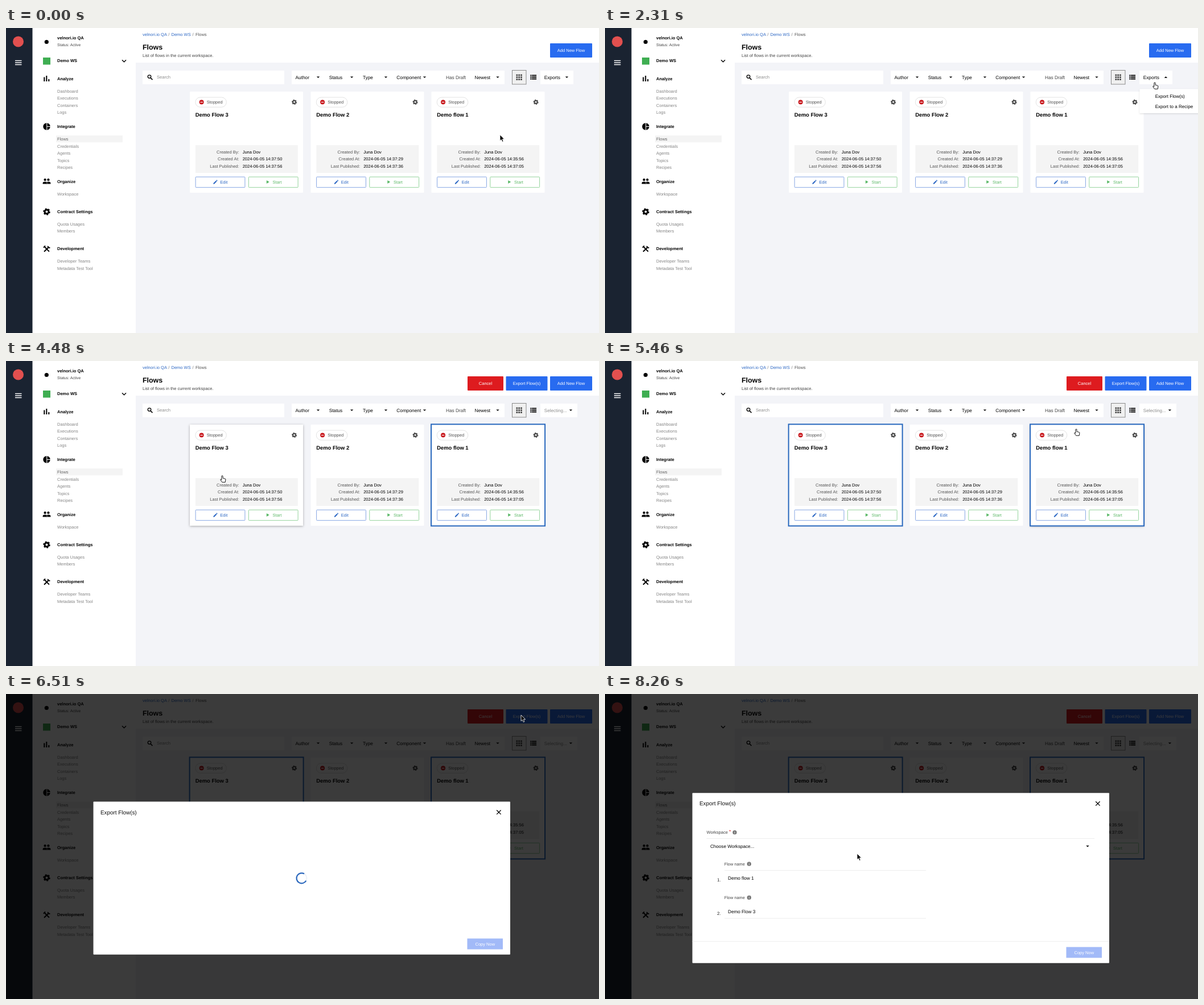
Recreate the animation shown at these times as an HTML page. Size 1042 by 537 pixels, loop 8.75 s.

```html
<!DOCTYPE html>
<html lang="en">
<head>
<meta charset="utf-8">
<title>Export flows</title>
<style>
  html, body { margin: 0; width: 100%; height: 100%; overflow: hidden; background: #fff; }
  svg { display: block; width: 100%; height: 100%; }
  text {
    font-family: "Liberation Sans", Arial, sans-serif;
    text-rendering: geometricPrecision;
    white-space: pre;
  }
</style>
</head>
<body>
<svg id="stage" viewBox="0 0 1042 537" xmlns="http://www.w3.org/2000/svg"></svg>
<script>
const LOOP = 8750, STEP = 70;
const ORG = 'velnori.io QA', USER = 'Juna Dov';
const BLUE = '#286bf0', PALE = '#a2baf8', LINK = '#2d68c4', GREY = '#858585';
const CARD_X = [323, 535.5, 747.5], CARD_Y = 112, CARD_W = 199, CARD_H = 178;

// y is the vertical middle of the line
const text = (x, y, s, size = 7.5, fill = '#000', extra = '') =>
  `<text x="${x}" y="${(y + size * 0.35).toFixed(2)}" font-size="${size}" fill="${fill}" ${extra}>${s}</text>`;
const bold = (x, y, s, size = 7.5) => text(x, y, s, size, '#000', 'font-weight="700"');
const mid = (x, y, s, fill) => text(x, y, s, 7.5, fill, 'text-anchor="middle"');
const rect = (x, y, w, h, fill, extra = '') =>
  `<rect x="${x}" y="${y}" width="${w}" height="${h}" fill="${fill}" ${extra}/>`;
const circle = (x, y, r, fill, extra = '') =>
  `<circle cx="${x}" cy="${y}" r="${r}" fill="${fill}" ${extra}/>`;
const path = (d, fill, extra = '') => `<path d="${d}" fill="${fill}" ${extra}/>`;
const line = (d, color, w, extra = '') => path(d, 'none', `stroke="${color}" stroke-width="${w}" ${extra}`);
const group = (id, body, extra = '') => `<g id="${id}" ${extra}>${body}</g>`;
const at = (x, y, s, body) => `<g transform="translate(${x} ${y}) scale(${s})">${body}</g>`;

const caret = (x, y, up = 1) => path(`M${x - 2.7} ${y - 1.3 * up}h5.4l-2.7 ${2.7 * up}z`, '#000');
const gear = (x, y, r, color) =>
  circle(x, y, r * 0.56, 'none', `stroke="${color}" stroke-width="${r * 0.48}"`) +
  circle(x, y, r * 0.84, 'none', `stroke="${color}" stroke-width="${r * 0.32}" pathLength="12" stroke-dasharray="1 1"`);
const info = (x, y) => circle(x, y, 3.6, '#757575') + rect(x - 0.45, y - 0.5, 0.9, 2.5, '#fff') +
  rect(x - 0.45, y - 2, 0.9, 0.9, '#fff');
const button = (x, w, s, fill, id = '') => rect(x, 27, w, 25, fill, `rx="1" ${id}`) + mid(x + w / 2, 39.6, s, '#fff');

function sidebar() {
  const sections = [
    ['Analyze', 89, 111, ['Dashboard', 'Executions', 'Containers', 'Logs']],
    ['Integrate', 173.5, 195.4, ['Flows', 'Credentials', 'Agents', 'Topics', 'Recipes']],
    ['Organize', 270, 292, ['Workspace']],
    ['Contract Settings', 323.3, 345, ['Quota Usages', 'Members']],
    ['Development', 388.8, 410.6, ['Developer Teams', 'Metadata Test Tool']]
  ];
  const menu = sections.map(([name, y, top, items]) => bold(90, y, name) +
    items.map((s, i) => text(90, top + i * 12.5, s, 7.5, s === 'Flows' ? '#666' : GREY)).join('')).join('');
  const person = x => circle(x, 267.2, 2.1, '#000') + path(`M${x - 4} 274.6v-1.6q0-2.6 4-2.6t4 2.6v1.6z`, '#000');
  return rect(0, 0, 46.5, 537, '#1a2331') +
    circle(21.5, 24, 9.5, '#e2504f') +
    line('M16 57.5h11.5M16 61h11.5M16 64.5h11.5', '#fff', 1.4) +
    circle(71.3, 24.5, 3.6, '#000') +
    bold(90, 17.2, ORG) + text(90, 29.6, 'Status: Active', 6.8, '#444') +
    rect(65, 52, 13, 12.5, '#3fae52') + bold(90, 57.8, 'Demo WS') +
    line('M204 56.2l3.5 3.5 3.5-3.5', '#000', 1.4) +
    rect(88, 189.3, 117, 12, '#f4f4f4') +
    line('M67.3 86.5v7.5M71.3 84v10M75.3 90v4', '#000', 2) +
    circle(71.5, 173.5, 6.2, '#000') + line('M71.8 167v13M71.8 173.5h7', '#fff', 1.1) +
    person(68.6) + person(74.4) + line('M72 270v5', '#fff', 0.6) +
    gear(71.5, 323.5, 6.3, '#000') +
    line('M67 393.8l8.6-8.6M67.5 385l8.4 8.6', '#000', 2) +
    line('M65.8 386.6l3.2-3.2M73.2 384l1.5 2.6 2.7.6', '#000', 1.8) + menu;
}

function header() {
  return text(240, 11.2, ORG, 7.5, LINK) + text(285.3, 11.2, '/', 7.5, '#777') +
    text(290.5, 11.2, 'Demo WS', 7.5, LINK) + text(327.6, 11.2, '/', 7.5, '#777') +
    text(333, 11.2, 'Flows', 7.5, '#555') +
    bold(240, 33.4, 'Flows', 12.4) +
    text(240, 48.8, 'List of flows in the current workspace.', 7.48, '#444') +
    group('actions', button(811, 63, 'Cancel', '#de1b1f') +
      button(878.5, 73, 'Export Flow(s)', PALE, 'id="exportBtn"')) +
    button(956, 74, 'Add New Flow', BLUE);
}

function filters() {
  const names = [['Author', 508.5, 548.5], ['Status', 567.7, 607.6], ['Type', 627, 667.5],
    ['Component', 686.3, 735.5], ['Newest', 823.5, 864]];
  let dots = '', rows = '';
  for (let i = 0; i < 9; i++) dots += rect(896.5 + i % 3 * 3.8, 81.6 + Math.floor(i / 3) * 3.8, 2.7, 2.7, '#444');
  for (let i = 0; i < 3; i++) {
    const y = 82.3 + i * 3.1;
    rows += rect(921.2, y, 2.3, 2.4, '#333') + rect(924.1, y, 8, 2.4, '#333');
  }
  return rect(240, 75, 249, 24, '#fff') +
    circle(252, 85.6, 2.8, 'none', 'stroke="#000" stroke-width="1.3"') + line('M254 87.7l3.4 3.4', '#000', 1.6) +
    text(265, 86.8, 'Search', 7.6, '#8c8c8c') +
    rect(502, 75, 374, 24, '#fff') +
    names.map(([s, x, c]) => text(x, 86.7, s, 8.3) + caret(c, 86.7)).join('') +
    text(773, 86.7, 'Has Draft', 8.3, '#444') +
    rect(889.5, 74.5, 24.5, 24.5, '#f0f0f0', 'stroke="#8a8a8a" stroke-width="1"') + dots + rows +
    group('exports', rect(939, 75, 58, 24, '#fff') + text(945.7, 86.7, 'Exports', 8.3)) +
    group('caretDown', caret(985.4, 86.7)) + group('caretUp', caret(985.4, 86.7, -1)) +
    group('selecting', rect(939, 75, 65, 24, '#fff') + text(945.8, 86.7, 'Selecting...', 8.1, '#8c8c8c') + caret(992.4, 86.7));
}

function card(x, i) {
  const [name, made, published] = [
    ['Demo Flow 3', '14:37:50', '14:37:56'],
    ['Demo Flow 2', '14:37:29', '14:37:36'],
    ['Demo flow 1', '14:35:56', '14:37:05']][i];
  const L = x + 9.8, day = '2024-06-05 ';
  const row = (y, label, value) =>
    text(x + 86.6, y, label, 7.5, '#555', 'text-anchor="end"') + text(x + 92.7, y, value);
  const box = (bx, color) => rect(bx, 262.2, 86.8, 18.5, '#fff', `rx="1" stroke="${color}" stroke-width="1"`);
  const pencil = path('M3 17.2V21h3.8L17.8 9.9l-3.7-3.7zM20.7 7a1 1 0 0 0 0-1.4l-2.3-2.3a1 1 0 0 0-1.4 0l-1.9 1.8 3.8 3.8z', LINK);
  return rect(x, CARD_Y, CARD_W, CARD_H, '#fff', `id="hover${i}" filter="url(#lift)"`) +
    rect(x, CARD_Y, CARD_W, CARD_H, '#fff', 'rx="1"') +
    rect(L, 122, 54.5, 17.3, '#fff', 'rx="8.6" stroke="#dfdfdf" stroke-width=".9"') +
    circle(x + 20.6, 130.6, 4, '#c8191e') + rect(x + 18.4, 130, 4.4, 1.2, '#fff') +
    text(x + 29.7, 130.7, 'Stopped', 7.5, '#555') +
    gear(x + 183.6, 130.4, 4.6, '#505050') +
    bold(L, 152.9, name, 9.4) +
    rect(L, 206.2, 180, 49, '#f4f4f4') +
    row(218.2, 'Created By:', USER) + row(230.7, 'Created At:', day + made) +
    row(243.2, 'Last Published:', day + published) +
    box(L + 0.3, '#86a6e3') + at(x + 40.2, 266.3, 0.4, pencil) + text(x + 53.3, 271.3, 'Edit', 7.5, LINK) +
    box(x + 103.3, '#93d39b') + path(`M${x + 134.8} 268.2v5.8l4.9-2.9z`, '#56b763') +
    text(x + 145.6, 271.3, 'Start', 7.5, '#5fb969') +
    rect(x - 0.4, CARD_Y - 0.6, CARD_W + 1, CARD_H + 1, 'none', `id="picked${i}" stroke="#2767bd" stroke-width="2"`);
}

const popups = () =>
  group('menu', rect(939.5, 107.5, 110, 42.5, '#fff', 'filter="url(#soft)"') +
    text(966.7, 119.8, 'Export Flow(s)', 8.08) + text(966.7, 138, 'Export to a Recipe', 8.08)) +
  circle(961.5, 85, 16, '#000', 'id="ripple" opacity=".06"') +
  group('tip', rect(855.5, 61, 119, 42, '#fff', 'filter="url(#soft)"') +
    rect(861.3, 65, 25.2, 25.6, '#fdbb0a') + circle(874, 77.8, 6, '#fff') +
    rect(873.4, 74.2, 1.2, 4.6, '#fdbb0a') + rect(873.4, 80, 1.2, 1.3, '#fdbb0a') +
    text(892.6, 78, 'Select at least 1 flow', 7.5, '#555'));

function dialog() {
  const frame = (y, h) => rect(153.5, y, 732.5, h, '#fff', 'rx="1"') +
    text(166, y + 18.7, 'Export Flow(s)', 9.9, '#111') +
    line(`M862.2 ${y + 15}l7.4 7.4m0-7.4l-7.4 7.4`, '#000', 1.3) +
    rect(810.5, y + h - 28.3, 62.5, 19, PALE) + mid(841.8, y + h - 18.6, 'Copy Now', '#fff');
  const rule = (x, y, end) => line(`M${x} ${y}H${end}`, '#ebebeb', 0.9);
  const flow = (y, n, name) => text(209.7, y, 'Flow name', 7.4, '#444') + info(253.2, y + 0.2) +
    text(197, y + 28, n + '.', 7.8, '#222') + text(216, y + 25.3, name, 8.2);
  const ring = circle(519.5, 324.3, 9, 'none', 'stroke="#edf1f7" stroke-width="2"') +
    line('M527.3 328.8A9 9 0 1 1 524 316.5', '#2b68bd', 2.2, 'id="spinner"');
  return rect(0, 0, 1042, 537, '#000', 'opacity=".77"') +
    group('loading', frame(189.5, 269.3) + ring) +
    group('form', frame(174.2, 299.6) +
      text(178.5, 243.5, 'Workspace', 7.5, '#444') + text(218, 242.5, '*', 8.5, '#e02020') + info(227.9, 243.7) +
      rule(178.5, 254.5, 860) + text(185, 268.1, 'Choose Workspace...', 8.1) + caret(848, 268) +
      flow(299, 1, 'Demo flow 1') + rule(210, 310.6, 564) +
      flow(358.2, 2, 'Demo Flow 3') + rule(210, 395, 564) + rule(153.5, 435.7, 886));
}

const pointer =
  path('M0 0V10.6L2.4 8.4 4.2 12.4 6 11.6 4.3 7.7H7.6Z', '#000', 'id="arrow" stroke="#fff" stroke-width=".8"') +
  path('M-1.1 1a1.1 1.1 0 0 1 2.2 0V4.4l3.8.9q1.2.3 1 1.6l-.7 4.5H-.2L-3.2 7.4q-.2-1.4 1-1l1.1.9z', '#fff',
    'id="hand" stroke="#000" stroke-width=".9" stroke-linejoin="round"');

document.getElementById('stage').innerHTML = `<defs>
  <filter id="lift" x="-10%" y="-10%" width="120%" height="120%">
    <feDropShadow dx="0" dy="1" stdDeviation="2.2" flood-opacity=".32"/></filter>
  <filter id="soft" x="-20%" y="-30%" width="140%" height="160%">
    <feDropShadow dx="0" dy="1" stdDeviation="1.6" flood-opacity=".14"/></filter></defs>` +
  rect(0, 0, 1042, 537, '#fff') + rect(228, 61, 814, 476, '#f3f4f8') +
  sidebar() + header() + filters() + CARD_X.map(card).join('') + popups() +
  group('dialog', dialog()) + group('cursor', pointer);

const el = {};
document.querySelectorAll('#stage [id]').forEach(n => el[n.id] = n);
const show = (id, on) => el[id].setAttribute('display', on ? 'inline' : 'none');

// pointer stops: time, x, y
const TRACK = [
  [0, 868, 188], [210, 945, 101], [420, 945, 101], [700, 960, 85], [2240, 960, 85], [2310, 966, 96],
  [2450, 985, 118], [2520, 960, 130], [2660, 598, 260], [2870, 912, 40], [3220, 912, 40], [3290, 958, 123],
  [3500, 862, 190], [3990, 862, 190], [4480, 380, 202], [4900, 395, 196], [5180, 395, 196], [5460, 828, 120],
  [5600, 828, 120], [6090, 905, 37], [6580, 905, 37], [7420, 560, 300], [8260, 443, 281], [LOOP, 443, 281]
];

function pointerAt(t) {
  const i = TRACK.findIndex(k => k[0] > t);
  const [t0, x0, y0] = TRACK[i - 1], [t1, x1, y1] = TRACK[i];
  const p = (t - t0) / (t1 - t0);
  return [x0 + (x1 - x0) * p, y0 + (y1 - y0) * p];
}

function draw(t) {
  const within = (a, b) => t >= a && t < b;
  const [x, y] = pointerAt(t);
  const choosing = t >= 2520, modal = t >= 6510, menu = within(1680, 2520);
  const over = choosing && !modal && y > CARD_Y && y < CARD_Y + CARD_H
    ? CARD_X.findIndex(c => x > c && x < c + CARD_W) : -1;
  const picked = [t >= 4970, false, t >= 3570];

  show('actions', choosing);
  show('selecting', choosing);
  show('exports', !choosing);
  show('caretUp', menu);
  show('caretDown', !menu && !choosing);
  show('menu', menu);
  show('tip', within(2870, 3360));
  show('ripple', within(840, 910) || within(1680, 1820));
  el.ripple.setAttribute('r', t < 1000 ? 16 : t < 1750 ? 19 : 22);
  picked.forEach((on, i) => {
    show('picked' + i, on);
    show('hover' + i, i === over);
  });

  const hot = x > 878 && x < 952 && y > 27 && y < 52 && !modal;
  el.exportBtn.setAttribute('fill', !picked[2] ? PALE : hot ? '#2055be' : BLUE);

  show('dialog', modal);
  show('loading', t < 7490);
  show('form', t >= 7490);
  el.spinner.setAttribute('transform', `rotate(${(t - 6510) * 0.36} 519.5 324.3)`);

  const hand = within(560, 2520) || over >= 0;
  show('hand', hand);
  show('arrow', !hand);
  el.cursor.setAttribute('transform', `translate(${x.toFixed(1)} ${y.toFixed(1)})`);
}

function tick() {
  draw(Math.floor(performance.now() % LOOP / STEP) * STEP);
  requestAnimationFrame(tick);
}
tick();
</script>
</body>
</html>
```
